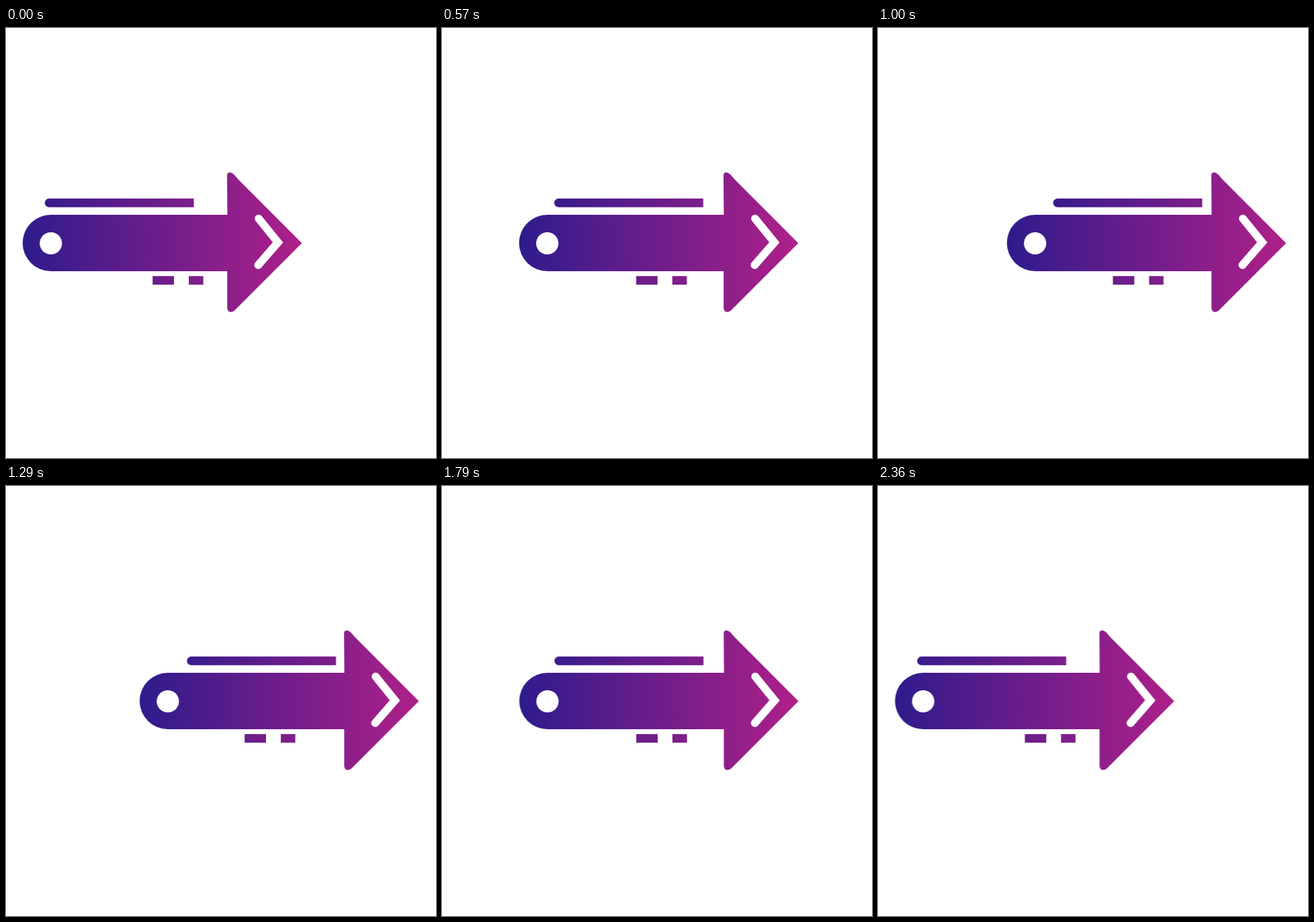
An HTML page that plays this animation: 640 px wide and 640 px high, repeating every 2430 ms.

```html
<!DOCTYPE html>
<html lang="en">
<head>
<meta charset="utf-8">
<title>Sliding arrow</title>
<style>
  html, body { margin: 0; width: 100%; height: 100%; overflow: hidden; background: #fff; }
  svg { display: block; width: 100%; height: 100%; }

  /* --reach is how far a part travels; --clock is stepped by the script */
  .part {
    fill: url(#ink);
    animation: slide 2430ms cubic-bezier(.5, .22, .5, .78) var(--clock, -36ms) infinite paused;
  }
  .arrow { --reach: 185px; }
  .bar { --reach: 224.8px; }
  .dashes { --reach: 145.5px; }

  @keyframes slide {
    0% { transform: translateX(calc(var(--reach) * -.0135)); }
    50% { transform: translateX(calc(var(--reach) * .9865)); }
    100% { transform: translateX(calc(var(--reach) * -.0108)); }
  }
</style>
</head>
<body>
<svg id="stage" viewBox="0 0 640 640">
  <defs>
    <linearGradient id="ink" gradientUnits="userSpaceOnUse" x1="24.7" y1="0" x2="440.3" y2="0">
      <stop offset="0" stop-color="#2f1b8c"/>
      <stop offset="1" stop-color="#af2089"/>
    </linearGradient>
  </defs>

  <path class="part bar" d="M64.1 253.8H279.5V266.7H64.1A6.45 6.45 0 0 1 64.1 253.8Z"/>

  <path class="part dashes" d="M218.2 369.3H250V382H218.2ZM272 369.3H293.6V382H272Z"/>

  <g class="part arrow">
    <path d="M66.7 278H329.4L329 219C329 213.5 336 213.5 341 220L345.5 225.2L440.3 320.2L341 419.5C335 425 329.3 423 329.2 416V362H66.7A42 42 0 0 1 66.7 278Z"/>
    <circle cx="66.7" cy="320.5" r="16.6" fill="#fff"/>
    <path d="M376 283.6L404.7 319L375.3 352.8" fill="none" stroke="#fff" stroke-width="11.8" stroke-linecap="round"/>
  </g>
</svg>
<script>
  const LOOP = 2430, STEPS = 34, RATE = 14;
  const stage = document.getElementById('stage');
  const start = performance.now();

  // The motion is held at 14 poses a second, on a 10 ms grid.
  function draw(now) {
    const time = Math.max(0, now - start) % LOOP;
    const step = Math.min(STEPS - 1, Math.floor((time + 5) * RATE / 1000));
    stage.style.setProperty('--clock', `${-(step + .5) / STEPS * LOOP}ms`);
    requestAnimationFrame(draw);
  }
  draw(start);
</script>
</body>
</html>
```
